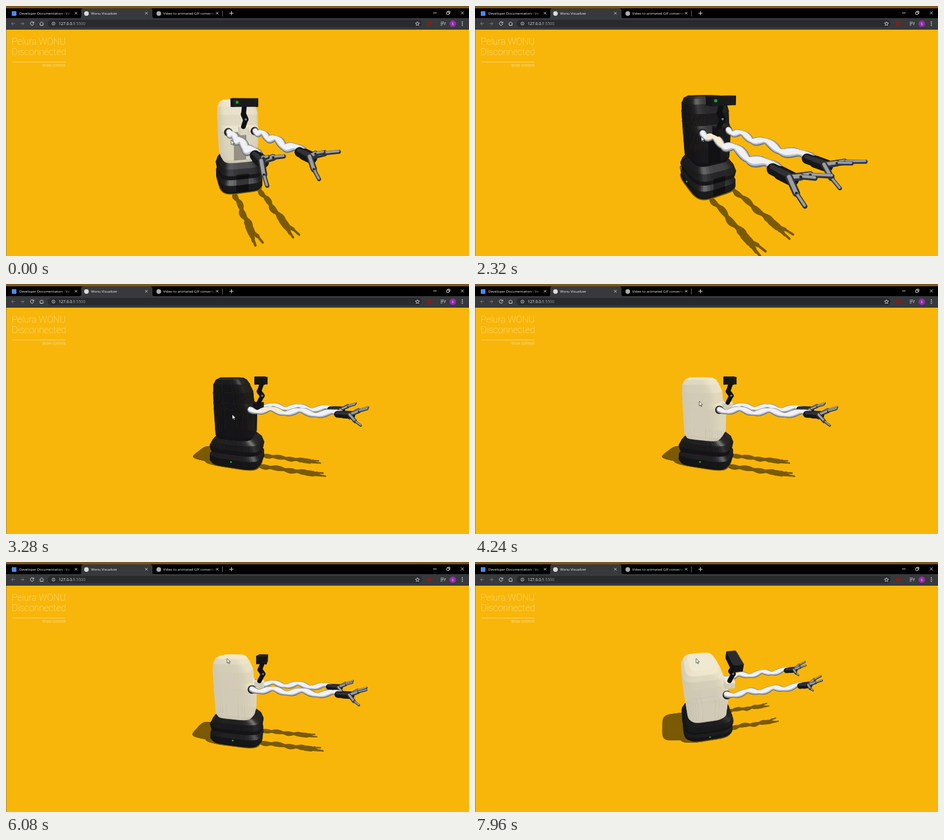
An HTML page with a canvas that plays this animation: 800x433 px, repeating every 8 s.

```html
<!DOCTYPE html>
<html lang="en">
<head>
<meta charset="utf-8">
<title>Wonu Visualizer</title>
<style>
html, body { margin: 0; width: 100%; height: 100%; overflow: hidden; background: #f8b60a; }
canvas, svg { position: absolute; left: 0; top: 0; width: 800px; height: 433px; display: block; }
.ui { font-family: "Open Sans", "Noto Sans", sans-serif; font-size: 6.1px; fill: #f4f5f7; }
.title { font-family: Roboto, sans-serif; font-weight: 100; font-size: 15.9px; fill: #ffebb0; }
.line { fill: none; stroke: #d4d5d8; }
.dim { stroke: #77787c; }
</style>
</head>
<body>
<canvas id="scene" width="800" height="433"></canvas>
<svg viewBox="0 0 800 433">
  <defs>
    <linearGradient id="fade"><stop offset="0" stop-color="#000" stop-opacity="0"/><stop offset="1"/></linearGradient>
  </defs>
  <rect width="800" height="41"/>
  <rect width="800" height="4" fill="#7c5918"/>
  <path d="M127 21q3 0 3-3V8q0-4 4-4h115q4 0 4 4v10q0 3 3 3H800V41H0V21Z" fill="#38393c"/>
  <rect x="72" y="24" width="646" height="13" rx="6.5" fill="#292a2d"/>
  <g class="ui">
    <rect x="10" y="9" width="8" height="8" rx="1" fill="#4a8af4"/>
    <text x="23" y="15">Developer Documentation - Vel</text>
    <rect x="101" y="8" width="13" height="10" fill="url(#fade)"/>
    <circle cx="139" cy="13" r="4" fill="#d9dadd"/>
    <text x="147" y="15">Wonu Visualizer</text>
    <circle cx="264" cy="13" r="4" fill="#a9acb3"/>
    <text x="271.5" y="15">Video to animated GIF converter</text>
    <rect x="350" y="8" width="12" height="10" fill="url(#fade)"/>
    <text x="91" y="33.2" style="font-size:6.8px">127.0.0.1<tspan fill="#9a9ca1">:5500</tspan></text>
    <circle cx="731.5" cy="30.5" r="4.3" fill="#7c211b"/>
    <circle cx="772" cy="30.7" r="5.6" fill="#9a2ab5"/>
    <text x="772" y="33" text-anchor="middle">S</text>
  </g>
  <g class="line">
    <path d="m119 10.5 4 4m0-4-4 4m121.500-4 4 4m0-4-4 4m122.500-4 4 4m0-4-4 4M386 12.500h7m-3.500-3.500v7"/>
    <path d="M738 12h6M761.500 10.500h4v4h-4zm1.500 0V9h4v4h-1.500M786 9.500l5 5m0-5-5 5"/>
    <path class="dim" d="M15.500 30.500h-6m3-3-3 3 3 3M25 30.500h6m-3-3 3 3-3 3M374 8v10"/>
    <path d="M47.500 28.500a3 3 0 1 0 .5 2.500m0-4v2.500h-2.500M58 30.500l3.500-3 3.500 3m-6 0v3h5v-3"/>
    <circle cx="82" cy="30.5" r="2.7" stroke-width=".8"/><path d="M82 29v3" stroke-width=".8"/>
    <path d="m711 27 1 2.400 2.600.2-2 1.700.6 2.600-2.200-1.400-2.200 1.400.6-2.600-2-1.700 2.600-.2zM751 28h6m-6 2.500h5m-5 2.500h3m4 0v-4h2" stroke-width=".9"/>
  </g>
  <path d="M788.500 27.500h.01m-.01 3h.01m-.01 3h.01" stroke="#d4d5d8" stroke-width="1.8" stroke-linecap="round"/>
  <path d="M.5 41V433" stroke="#a98a3c"/>
  <g class="title">
    <text x="10" y="67">Pelura WONU</text>
    <text x="10" y="85">Disconnected</text>
    <path d="M11 97h92" stroke="#fbd478"/>
    <text x="103" y="105" text-anchor="end" style="font-size:6.5px;font-weight:300">show controls</text>
  </g>
  <path id="cursor" d="M0 0v8.200l1.900-1.700 1.300 2.900 1.300-.6-1.300-2.800h2.500Z" fill="#fff" stroke="#222" stroke-width=".7"/>
</svg>
<script>
const ctx = document.getElementById('scene').getContext('2d');
const cursor = document.getElementById('cursor');
const LOOP = 8000, FOCAL = 285, GROUND = -71;
const HOVER_ARM = 480, HOVER_BODY = 3960;
const SHADOW = '#7a5a05';

// time, azimuth from the robot's front, elevation, distance
const orbit = [
  [0, 14, 13.5, 285], [880, 14, 13.5, 285], [1680, 10, 12.5, 293], [2320, 28, 18, 262],
  [3280, 73, 13.5, 285], [5900, 73, 13.5, 285], [6560, 98, 43, 270], [7500, 100, 45, 272]
];
const pointer = [[400, 389, 232], [840, 389, 224], [2320, 391, 226], [3900, 391, 226], [4700, 382, 167]];

// Model space: x forward, y to the robot's left, z up from the orbit centre.
// Rings of a solid: height, back, front, half width.
const baseRings = [
  [-71, -42, 42, 34], [-66, -45, 46, 36], [-56, -44, 45, 36], [-49, -39, 40, 32], [-47, -43, 44, 35],
  [-40, -44, 45, 36], [-31, -39, 41, 33], [-24, -33, 32, 29]
];
const torsoRings = [
  [-26, -31, 27, 27], [-20, -34, 31, 30], [25, -35, 31, 31], [34, -35, 25, 31],
  [50, -35, 23, 31], [62, -34, 17, 30], [69, -30, 12, 27], [72, -24, 7, 21]
];
const box = (x0, x1, half, z0, z1) => [[z0, x0, x1, half], [z1, x0, x1, half]];
const barRings = box(32, 46, 18, 62, 73);
const plinthRings = box(29, 43, 6, 22, 33);
const neck = [[36, 0, 33, 3], [41, 2, 44, 4], [36, 0, 51, 4], [40, 0, 63, 3]];

const mix = (a, b, k) => a + (b - a) * k;
const minus = (a, b) => a.map((v, i) => v - b[i]);
const dot = (a, b) => a[0] * b[0] + a[1] * b[1] + a[2] * b[2];
const cross = (a, b) => [a[1] * b[2] - a[2] * b[1], a[2] * b[0] - a[0] * b[2], a[0] * b[1] - a[1] * b[0]];
const unit = a => a.map(v => v / (Math.hypot(...a) || 1));
const LIGHT = unit([.38, -.06, 1]);

function sample(table, t) {
  const i = table.findIndex(row => row[0] > t);
  if (i < 1) return table.at(i).slice(1);
  const a = table[i - 1], b = table[i], k = (t - a[0]) / (b[0] - a[0]);
  return a.slice(1).map((v, j) => mix(v, b[j + 1], k * k * (3 - 2 * k)));
}

let cam;
function setCamera(azimuth, elevation, distance) {
  const a = azimuth * Math.PI / 180, e = elevation * Math.PI / 180;
  const back = [Math.cos(e) * Math.cos(a), -Math.cos(e) * Math.sin(a), Math.sin(e)];
  const right = [Math.sin(a), Math.cos(a), 0];
  cam = { azimuth, distance, back, right, up: cross(back, right), eye: back.map(v => v * distance) };
}

// Screen x, screen y, scale.
function project(p) {
  const s = FOCAL / (cam.distance - dot(p, cam.back));
  return [400 + dot(p, cam.right) * s, 237 - dot(p, cam.up) * s, s];
}

function cast([x, y, z, r]) {
  const h = z - GROUND;
  return [x - .38 * h, y + .06 * h, GROUND, r * .85];
}

function face(points, color) {
  ctx.beginPath();
  points.forEach(p => ctx.lineTo(...project(p).slice(0, 2)));
  ctx.closePath();
  ctx.fillStyle = ctx.strokeStyle = color;
  ctx.lineWidth = .6;
  ctx.fill();
  ctx.stroke();
}

function outline([z, x0, x1, half], power) {
  const bend = v => Math.sign(v) * Math.abs(v) ** power;
  return Array.from({ length: 48 }, (_, i) => {
    const q = (i + .5) / 48 * Math.PI * 2;
    return [(x0 + x1) / 2 + (x1 - x0) / 2 * bend(Math.cos(q)), half * bend(Math.sin(q)), z];
  });
}

// Stack of rounded rings; without paint it is drawn as its shadow.
function solid(rings, paint, power = .45) {
  const loops = rings.map(r => outline(r, power));
  loops.slice(1).forEach((hi, i) => {
    const lo = loops[i];
    lo.forEach((a, j) => {
      const n = (j + 1) % lo.length, quad = [a, lo[n], hi[n], hi[j]];
      const normal = unit(cross(minus(lo[n], a), minus(hi[j], a)));
      if (!paint) face(quad.map(cast), SHADOW);
      else if (dot(normal, minus(cam.eye, a)) > 0) face(quad, paint(normal));
    });
  });
  const top = loops.at(-1);
  face(paint ? top : top.map(cast), paint ? paint([0, 0, 1]) : SHADOW);
}

const cream = n => {
  const v = .87 + .15 * Math.max(0, dot(n, LIGHT));
  return `rgb(${238 * v},${231 * v},${208 * v})`;
};
const black = n => {
  const lit = Math.max(0, dot(n, LIGHT));
  const shine = Math.max(0, dot(n, unit(LIGHT.map((v, i) => v + cam.back[i])))) ** 22;
  const v = 20 + 16 * lit + 85 * shine;
  return `rgb(${v},${v},${v + 3})`;
};

function limb(points, color, width = 1, lift = 0) {
  ctx.strokeStyle = color;
  ctx.lineCap = 'round';
  points.slice(1).forEach((p, i) => {
    const a = project(points[i]), b = project(p);
    ctx.lineWidth = (points[i][3] + p[3]) * a[2] * width;
    ctx.beginPath();
    ctx.moveTo(a[0] - lift * a[2] * .4, a[1] - lift * a[2]);
    ctx.lineTo(b[0] - lift * b[2] * .4, b[1] - lift * b[2]);
    ctx.stroke();
  });
}

function spot(p, r, color) {
  const [x, y, s] = project(p);
  ctx.beginPath();
  ctx.arc(x, y, r * s, 0, 7);
  ctx.fillStyle = color;
  ctx.fill();
}

// Bulging links joined by short vertical steps.
function makeArm(y) {
  const sleeve = Array.from({ length: 49 }, (_, i) => {
    const s = i / 48, wave = s * Math.PI * 2 * 3;
    return [mix(27, 149, s), y + Math.cos(wave) * 1.2, 24 - 2.8 * Math.sin(wave), 4 + 1.1 * Math.cos(wave * 2)];
  });
  const cuff = [[145, y, 24, 4], [152, y, 24, 5], [161, y, 24, 5.2]];
  const fingers = [[180, 6, 10], [176, -3, 9], [173, -1, -13]].map(([x, dy, dz]) => [
    [159, y, 24, 3], [mix(159, x, .5), y + dy * .7, 24 + dz * .6, 2.1], [x, y + dy, 24 + dz, 1]
  ]);
  return { shoulder: [27, y, 24], sleeve, cuff, fingers };
}
const arms = [makeArm(21), makeArm(-21)];

function drawArm({ shoulder, sleeve, cuff, fingers }, hover) {
  spot(shoulder, 6.5, '#222326');
  const tones = [['#6f737c', 1, 0], ['#b9bdc6', .84, .5], ['#f0f1f4', .6, 1]];
  tones.forEach(tone => limb(sleeve, ...tone));
  if (hover) limb(sleeve.slice(8, 19), '#f4ecce', .68, .8);
  limb(cuff, '#161719');
  limb(cuff, '#303236', .4, 1.8);
  fingers.forEach(f => {
    limb(f, '#303236');
    limb(f, '#9a9da4', .55, .5);
    spot(f[1], .9, '#242629');
  });
}

function drawHead(skin) {
  solid(plinthRings, skin, .15);
  limb(neck, '#0f1011');
  spot(neck[1], 1.6, '#777a80');
  solid(barRings, black, .1);
  if (cam.azimuth < 62) spot([46, -12, 68], 2, '#13a52a');
}

function drawTorso(skin) {
  solid(torsoRings, skin);
  const strip = (x, z0, z1) => [[x, -13, z0], [x, 6, z0], [x, 6, z1], [x, -13, z1]];
  if (cam.azimuth < 65) {
    face(strip(31, -20, 24), 'rgba(0,0,0,.32)');
    face(strip(46, -66, -38), 'rgba(0,0,0,.4)');
  }
}

function draw(t) {
  setCamera(...sample(orbit, t));
  const armHover = t >= HOVER_ARM && t < HOVER_BODY;
  const skin = armHover ? black : cream;

  ctx.fillStyle = '#f8b60a';
  ctx.fillRect(0, 0, 800, 433);
  [baseRings, torsoRings].forEach(r => solid(r));
  arms.forEach(({ sleeve, cuff, fingers }) => [sleeve, cuff, ...fingers].forEach(p => limb(p.map(cast), SHADOW)));

  solid(baseRings, black);
  if (cam.azimuth > 20) spot([0, -36, -60], 1.4, '#2fae35');
  const parts = [
    { at: [0, 0, 0], paint: () => drawTorso(skin) },
    { at: [38, 0, 60], paint: () => drawHead(skin) },
    ...arms.map((arm, i) => ({ at: arm.shoulder, paint: () => drawArm(arm, i === 1 && armHover) }))
  ];
  parts.sort((a, b) => dot(a.at, cam.back) - dot(b.at, cam.back)).forEach(part => part.paint());

  cursor.setAttribute('transform', `translate(${sample(pointer, t).join(' ')})`);
}

const start = performance.now();
function tick() {
  const t = (performance.now() - start) % LOOP;
  draw(Math.floor(t / 40) * 40);
  requestAnimationFrame(tick);
}
tick();
</script>
</body>
</html>
```
